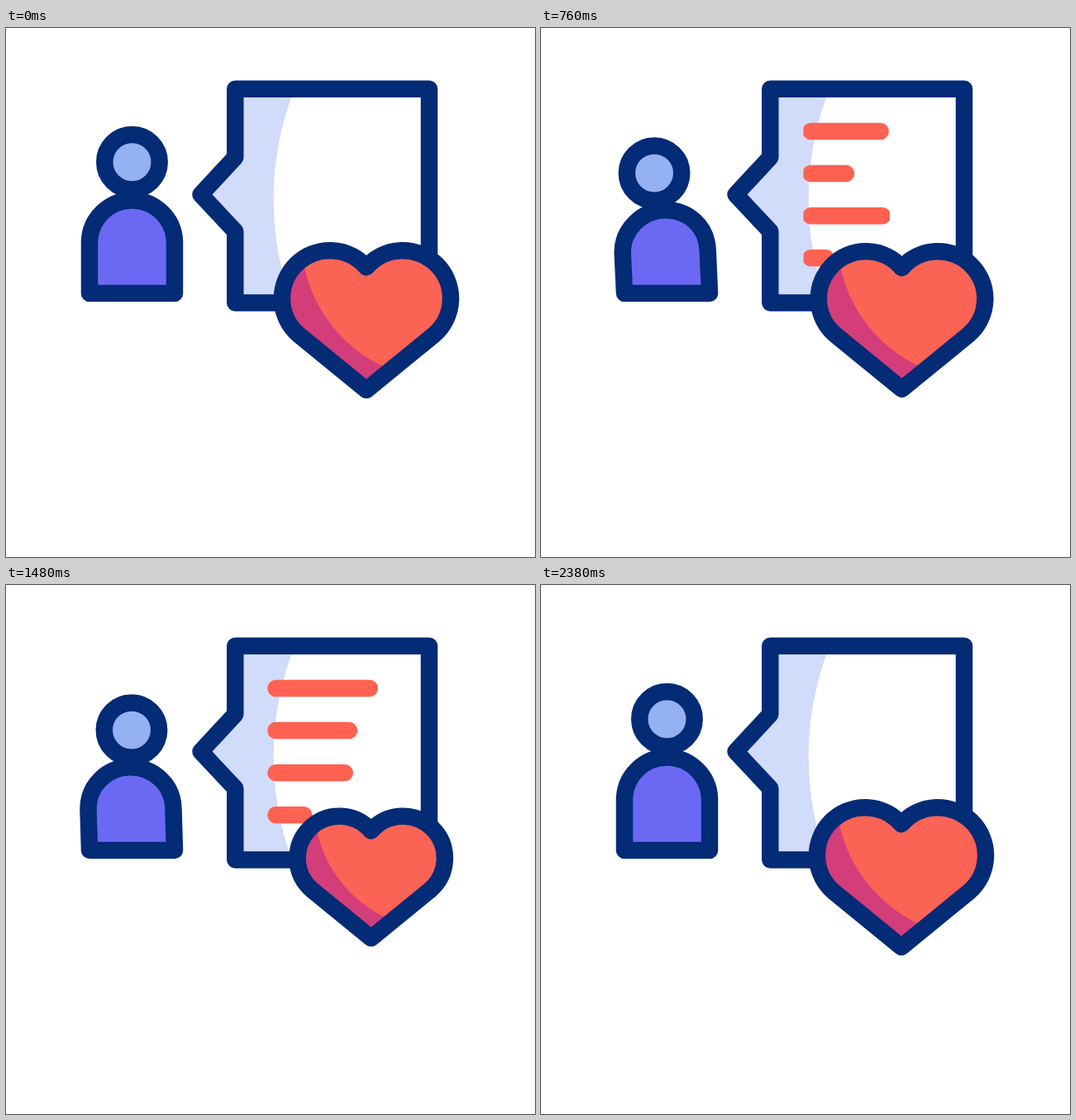
An HTML page that plays this animation: 640x640 px, repeating every 2.4 s.

```html
<!DOCTYPE html>
<html lang="en">
<head>
<meta charset="utf-8">
<title>Feedback</title>
<style>
  html, body { margin: 0; height: 100%; overflow: hidden; background: #fff; }
  svg { display: block; width: 100vw; height: 100vh; }
  .outline { stroke: #032b76; stroke-width: 20.5; stroke-linejoin: round; }
</style>
</head>
<body>
<svg viewBox="0 0 640 640">
  <clipPath id="window"><rect id="clipBox" y="74" height="258"/></clipPath>

  <path id="body" class="outline" fill="#6b69f4"/>
  <circle id="head" class="outline" r="33.2" fill="#94b1f2"/>

  <path fill="#d1dbfa" d="M277 74H349A364 364 0 0 0 346 333H277V246L236 202L277 157Z"/>
  <g clip-path="url(#window)">
    <g id="lines" stroke="#ff6251" stroke-width="20.5" stroke-linecap="round">
      <path/><path/><path/><path/>
    </g>
  </g>
  <path class="outline" fill="none" d="M277.3 73.8H512V332.6H277.3V246L235.5 201.5L277.3 156.5Z"/>

  <g id="heart">
    <path fill="#fb6355" d="M436 289.4A58 58 0 1 0 354 371L436 438L518 371A58 58 0 1 0 436 289.4Z"/>
    <path fill="#d33e7a" d="M358 278L361 290A175 175 0 0 0 455 409L463 416L436 438L354 371A58 58 0 0 1 358 278Z"/>
    <path id="heartEdge" class="outline" fill="none" d="M436 289.4A58 58 0 1 0 354 371L436 438L518 371A58 58 0 1 0 436 289.4Z"/>
  </g>
</svg>
<script>
  const LOOP = 2400;
  const $ = id => document.getElementById(id);
  const rows = [...$('lines').children];
  // Right end of each text line: resting and stretched
  const ends = [[415, 487], [370, 483], [424, 416], [352, 390]];

  const mix = (a, b, k) => a + (b - a) * k;
  // Eased progress from 0 to 1 between two times
  const ease = (t, from, to) => {
    const k = Math.min(1, Math.max(0, (t - from) / (to - from)));
    return (1 - Math.cos(Math.PI * k)) / 2;
  };

  function drawPerson(t) {
    const sway = -21.5 * ease(t, 0, 600) + 37.2 * ease(t, 600, 1210)
               - 37.2 * ease(t, 1210, 1800) + 21.5 * ease(t, 1800, LOOP);
    const sink = ease(t, 0, 640) - ease(t, 1700, LOOP);

    $('head').setAttribute('cx', 152.5 + sway);
    $('head').setAttribute('cy', 162.3 + 13.3 * sink);

    const dx = -1.5 * sink + 0.05 * sway;
    const tilt = 0.12 * sway;
    const lean = 0.06 * sway;
    const left = 101 + dx, right = 204 + dx, top = 208.5 + 11.7 * sink;
    const apex = 152.5 - 2 * sink;
    const leftY = 260 + 11 * sink - tilt, rightY = 260 + 11 * sink + tilt;
    $('body').setAttribute('d', `M101 321L${left} ${leftY}
      C${left + lean} ${leftY - 28.4} ${apex - 28.4} ${top} ${apex} ${top}
      S${right + lean} ${rightY - 28.4} ${right} ${rightY}L204 321Z`);
  }

  function drawLines(t) {
    const stretch = ease(t, 660, 1205) - ease(t, 1205, 1749);
    const shift = 215 * (1 - ease(t, 320, 740) + ease(t, 1790, LOOP));
    const narrow = t < 770 || t > 1745;
    $('clipBox').setAttribute('x', narrow ? 317.5 : 300);
    $('clipBox').setAttribute('width', narrow ? 104.5 : 212);
    rows.forEach((row, i) => {
      const end = mix(...ends[i], stretch) - 10.25;
      row.setAttribute('d', `M326.5 ${125 + 51.1 * i + shift}H${end}`);
    });
  }

  function drawHeart(t) {
    const scale = 1 - 0.27 * (ease(t, 690, 1200) - ease(t, 1200, 1740));
    $('heart').setAttribute('transform',
      `translate(481.5 353) scale(${scale}) translate(-481.5 -353)`);
    $('heartEdge').style.strokeWidth = 20.5 / scale;
  }

  function draw(now) {
    const t = now % LOOP;
    drawPerson(t);
    drawLines(t);
    drawHeart(t);
    requestAnimationFrame(draw);
  }
  draw(0);
</script>
</body>
</html>
```
